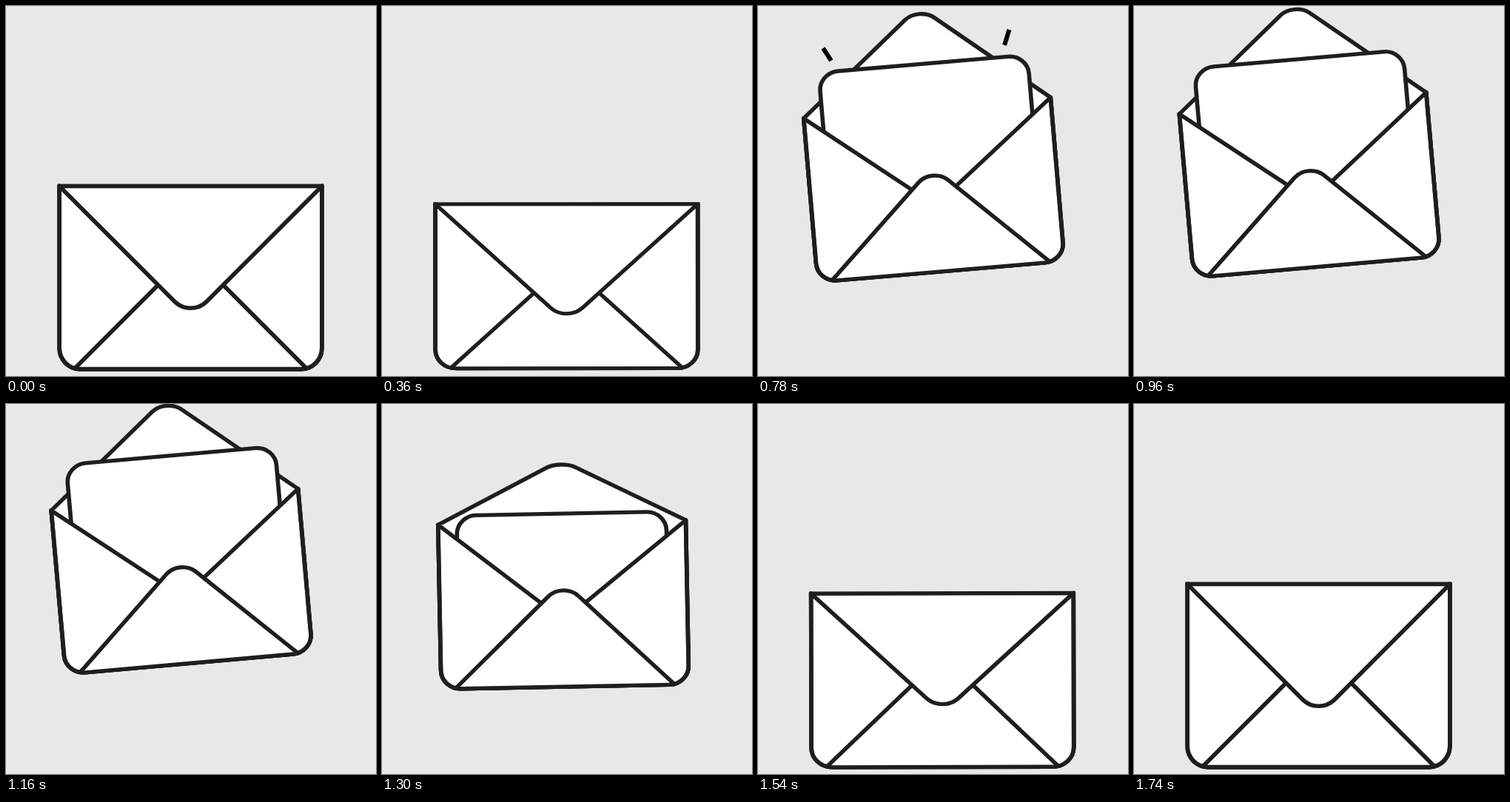
Recreate the animation shown at these times as an HTML page with a canvas. Size 500 by 500 pixels, loop 2200 ms.

```html
<!DOCTYPE html>
<html lang="en">
<head>
<meta charset="utf-8">
<title>Envelope</title>
<style>
html, body { margin: 0; width: 100%; height: 100%; overflow: hidden; background: #e8e8e8; }
canvas { display: block; }
</style>
</head>
<body>
<canvas id="stage" width="500" height="500"></canvas>
<script>
const ctx = document.getElementById('stage').getContext('2d');
const LOOP = 2200, JUMP = 360, DROP = 1160, LAND = 1455;
const W = 354.6, H = 247.2, R = 28, MID = W / 2, LINE = 5.6;

const ramp = (t, from, to) => Math.min(1, Math.max(0, (t - from) / (to - from)));
const ease = (t, from, to) => {
  const u = ramp(t, from, to);
  return u * u * (3 - 2 * u);
};
// Fast start that settles exponentially.
const settle = (t, from, tau) => 1 - Math.exp(-Math.max(0, t - from) / tau);

function poseAt(t) {
  const squash = ease(t, 0, JUMP) - ease(t, 1400, 1680);
  const lift = settle(t, JUMP, 155) * (1 - ramp(t, DROP, LAND) ** 2);
  const narrow = ease(t, JUMP, 740) - ease(t, 1300, 1540);
  const opening = ease(t, JUMP, 725), closing = ease(t, 1200, 1575);
  return {
    x: 249.5 - 2.1 * narrow,
    y: 490.6 - 141 * lift,
    scaleX: 1 - 0.056 * narrow,
    scaleY: 1 - 0.102 * squash,
    angle: -5.05 * settle(t, JUMP, 125) + 7 * ease(t, DROP, 1420)
      - 3 * ease(t, 1440, 1600) + 1.05 * ease(t, 1600, 1740),
    flap: 1 - 1.86 * (opening - closing),
    skew: -41 * Math.sin(Math.PI * opening),
    letter: 18 - 84.6 * (ease(t, 540, 780) - ease(t, DROP, 1400))
  };
}

function paint(path) {
  ctx.fill(path);
  ctx.stroke(path);
}

// Sides and rounded bottom, from the top right corner to the top left.
function addSides(path) {
  path.lineTo(W, 0);
  path.arcTo(W, H, W - R, H, R);
  path.arcTo(0, H, 0, H - R, R);
  path.lineTo(0, 0);
  return path;
}

function flapPath(s, skew) {
  const p = new Path2D();
  const at = (u, v) => [MID + u + skew * v / 165, v * s];
  p.moveTo(0, 0);
  p.lineTo(...at(-20.5, 157));
  p.bezierCurveTo(...at(-9.5, 167.5), ...at(9.5, 167.5), ...at(20.5, 157));
  p.lineTo(W, 0);
  return p;
}

function letterPath(top) {
  const p = new Path2D();
  p.roundRect(MID - 150.5, top, 300, 200, R);
  return p;
}

function pocketPath() {
  const p = new Path2D();
  p.moveTo(0, 0);
  p.lineTo(MID, MID * 0.83);
  return addSides(p);
}

function frontPath() {
  const p = new Path2D();
  p.moveTo(21, H - 1);
  p.lineTo(MID - 21, 110.5);
  p.bezierCurveTo(MID - 9.5, 99.5, MID + 9.5, 99.5, MID + 21, 110.5);
  p.lineTo(W - 21, H - 1);
  return p;
}

function drawEnvelope(s) {
  const open = s.flap <= 0;
  const flap = flapPath(s.flap, s.skew), sides = addSides(new Path2D());

  ctx.save();
  ctx.translate(s.x, s.y);
  ctx.rotate(s.angle * Math.PI / 180);
  ctx.scale(s.scaleX, s.scaleY);
  ctx.translate(-MID, -H);
  ctx.lineWidth = LINE / s.scaleX;
  ctx.lineCap = ctx.lineJoin = 'round';
  ctx.strokeStyle = '#1e1e1e';
  ctx.fillStyle = '#fff';

  if (open) paint(flap);
  paint(sides);
  paint(letterPath(s.letter));
  paint(pocketPath());
  paint(frontPath());
  if (!open) {
    paint(flap);
    sides.closePath();
    ctx.lineJoin = 'miter';
  }
  ctx.stroke(sides);
  ctx.restore();
}

function drawSpark(x, y, dx, dy, t) {
  const tail = ramp(t, 780, 880), head = ramp(t, 680, 780);
  if (head <= tail) return;
  ctx.strokeStyle = '#000';
  ctx.lineWidth = 6;
  ctx.beginPath();
  ctx.moveTo(x + dx * tail, y + dy * tail);
  ctx.lineTo(x + dx * head, y + dy * head);
  ctx.stroke();
}

const start = performance.now();
function frame() {
  const t = (performance.now() - start) % LOOP;
  ctx.fillStyle = '#e8e8e8';
  ctx.fillRect(0, 0, 500, 500);
  drawEnvelope(poseAt(t));
  drawSpark(99, 74, -11, -17, t);
  drawSpark(333, 53, 6.5, -21, t);
  requestAnimationFrame(frame);
}
frame();
</script>
</body>
</html>
```
